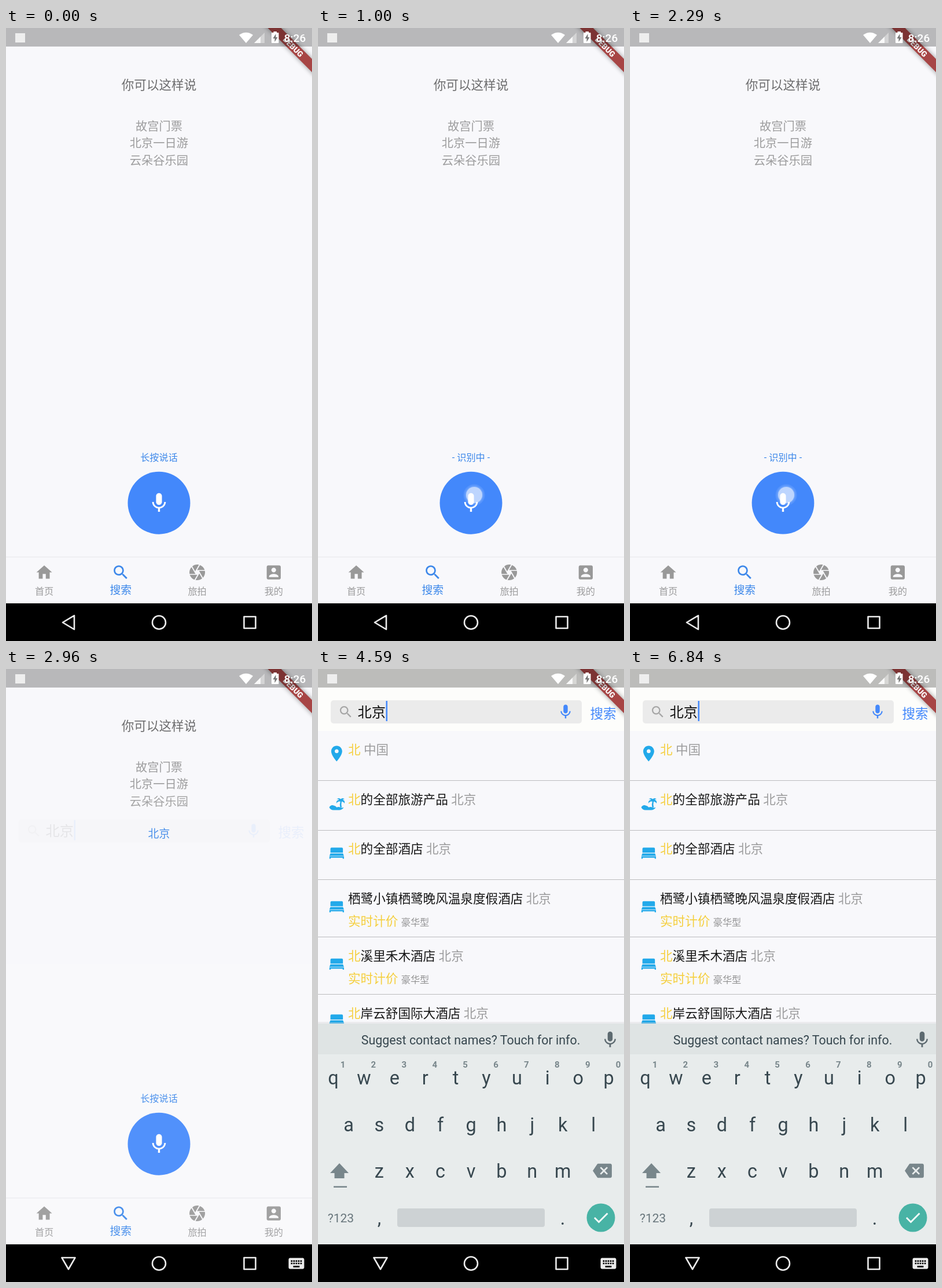
An HTML page for the animation above (6.89 s loop, 529 by 1058 pixels).

```html
<!DOCTYPE html>
<html lang="zh-CN">
<head>
<meta charset="utf-8">
<title>语音搜索</title>
<style>
  html, body { margin: 0; width: 100%; height: 100%; overflow: hidden; background: #f8f8fb; }
  svg { display: block; width: 100%; height: 100%; }
  text { font-family: Roboto, "Noto Sans CJK SC", "Noto Sans CJK", sans-serif; }
</style>
</head>
<body>
<svg id="stage" viewBox="0 0 529 1058"></svg>
<script>
const LOOP = 6890;
const PRESS = 980, PULSE = 680, RELEASE = 2440, RESULT = 2880, IME = 2920, RESUME = 4360, SETTLED = 4540;
const BG = '#f8f8fb', BLUE = '#4388fb', LINK = '#3d88ea', GREY = '#9c9c9d', YELLOW = '#f5cf3e', SKY = '#22a9ea', SLATE = '#37474f', DIM = '#78868b';

// 24-unit icon outlines
const ICON = {
  mic: 'M12 14c1.66 0 2.99-1.34 2.99-3L15 5c0-1.66-1.34-3-3-3S9 3.34 9 5v6c0 1.66 1.34 3 3 3zm5.3-3c0 3-2.54 5.1-5.3 5.1S6.7 14 6.7 11H5c0 3.41 2.72 6.23 6 6.72V21h2v-3.28c3.28-.48 6-3.3 6-6.72h-1.7z',
  search: 'M15.5 14h-.79l-.28-.27C15.41 12.59 16 11.11 16 9.5 16 5.91 13.09 3 9.5 3S3 5.91 3 9.5 5.91 16 9.5 16c1.61 0 3.09-.59 4.23-1.57l.27.28v.79l5 4.99L20.49 19l-4.99-5zm-6 0C7.01 14 5 11.99 5 9.5S7.01 5 9.5 5 14 7.01 14 9.5 11.99 14 9.5 14z',
  home: 'M10 20v-6h4v6h5v-8h3L12 3 2 12h3v8z',
  camera: 'M9.4 10.5l4.77-8.26C13.47 2.09 12.75 2 12 2c-2.4 0-4.6.85-6.32 2.25l3.66 6.35.06-.1zM21.54 9c-.92-2.92-3.15-5.26-6-6.34L11.88 9h9.66zm.26 1h-7.49l.29.5 4.76 8.25C21 16.97 22 14.61 22 12c0-.69-.07-1.35-.2-2zM8.54 12l-3.9-6.75C3.01 7.03 2 9.39 2 12c0 .69.07 1.35.2 2h7.49l-1.15-2zm-6.08 3c.92 2.92 3.15 5.26 6 6.34L12.12 15H2.46zm11.27 0l-3.9 6.76c.7.15 1.42.24 2.17.24 2.4 0 4.6-.85 6.32-2.25l-3.66-6.35-.93 1.6z',
  account: 'M3 5v14c0 1.1.89 2 2 2h14c1.1 0 2-.9 2-2V5c0-1.1-.9-2-2-2H5c-1.11 0-2 .9-2 2zm12 4c0 1.66-1.34 3-3 3s-3-1.34-3-3 1.34-3 3-3 3 1.34 3 3zm-9 8c0-2 4-3.1 6-3.1s6 1.1 6 3.1v1H6v-1z',
  place: 'M12 2C8.13 2 5 5.13 5 9c0 5.25 7 13 7 13s7-7.75 7-13c0-3.87-3.13-7-7-7zm0 9.5c-1.38 0-2.5-1.12-2.5-2.5s1.12-2.5 2.5-2.5 2.5 1.12 2.5 2.5-1.12 2.5-2.5 2.5z',
  bed: 'M5.5 5.5h13q1.5 0 1.5 1.5v5H4V7q0-1.500 1.500-1.500zM4 13h16l1.300 3H2.700zM2.700 16.700h18.600v3h-1.600v-1.300H4.300v1.300H2.700z',
  palm: 'M2.500 17q2-3.500 5.500-2.500 3 .5 4 2.500 2.500-1 4.500 0 1.500 1 4.500.2-2 3.300-6 3.300H8q-4 0-5.500-3.500zM16.500 17q-1-4 .2-7.500-3.700-.5-5 2.700-.7-4.500 3.500-4.700-1.700-1.500-3.200-.8 2.500-2.700 5.200-.3 2.300-2.400 4.900.3-1.600-.3-2.500.6 3.400.6 2.400 4.900-1-2.600-3.600-2.600-1 3.800.1 7.400z',
  backspace: 'M22 3H7c-.69 0-1.23.35-1.59.88L0 12l5.41 8.11c.36.53.9.89 1.59.89h15c1.1 0 2-.9 2-2V5c0-1.1-.9-2-2-2zm-3 12.59L17.59 17 14 13.41 10.41 17 9 15.59 12.59 12 9 8.41 10.41 7 14 10.59 17.59 7 19 8.41 15.41 12 19 15.59z',
  keyboard: 'M20 5H4c-1.1 0-1.99.9-1.99 2L2 17c0 1.1.9 2 2 2h16c1.1 0 2-.9 2-2V7c0-1.1-.9-2-2-2zm-9 3h2v2h-2V8zm0 3h2v2h-2v-2zM8 8h2v2H8V8zm0 3h2v2H8v-2zm-1 2H5v-2h2v2zm0-3H5V8h2v2zm9 7H8v-2h8v2zm0-4h-2v-2h2v2zm0-3h-2V8h2v2zm3 3h-2v-2h2v2zm0-3h-2V8h2v2z'
};

const icon = (name, cx, cy, scale, fill) =>
  `<path d="${ICON[name]}" fill="${fill}" transform="translate(${cx} ${cy}) scale(${scale}) translate(-12 -12)"/>`;
const rect = (x, y, w, h, fill, extra = '') =>
  `<rect x="${x}" y="${y}" width="${w}" height="${h}" fill="${fill}" ${extra}/>`;
const label = (str, x, baseline, size, fill, anchor = 'middle', extra = '') =>
  `<text x="${x}" y="${baseline}" font-size="${size}" fill="${fill}" text-anchor="${anchor}" ${extra}>${str}</text>`;
// Chinese text placed by the middle of its em box
const han = (str, x, cy, size, fill, anchor) => label(str, x, cy + size * 0.38, size, fill, anchor);
const span = (str, fill, size = 21.6) => `<tspan fill="${fill}" font-size="${size}">${str}</tspan>`;

function speakPage() {
  const tabs = [['home', '首页'], ['search', '搜索'], ['camera', '旅拍'], ['account', '我的']];
  return rect(0, 0, 529, 993, BG)
    + han('你可以这样说', 264.5, 98, 21.6, '#6c6c6d')
    + ['故宫门票', '北京一日游', '云朵谷乐园'].map((s, i) => han(s, 264.5, 169 + i * 29.7, 20.25, GREY)).join('')
    + `<g id="result">${han('北京', 264.5, 284, 18.9, LINK)}</g>`
    + `<g id="idle">${han('长按说话', 264.5, 741, 16.2, LINK)}</g>`
    + `<g id="busy">${han('- 识别中 -', 264.5, 741, 16.2, LINK)}</g>`
    + `<g id="mic"><circle id="disc" cx="264.500" cy="819.700" r="54" fill="${BLUE}"/>${icon('mic', 264.5, 819.7, 1.69, '#fff')}</g>`
    + rect(0, 912, 529, 2, '#000', 'opacity=".035"')
    + tabs.map(([name, s], i) => {
        const x = 66.1 + i * 132.25, on = i === 1;
        return icon(name, x, 939.6, 1.35, on ? LINK : '#999')
          + han(s, x, on ? 970 : 972, on ? 18.9 : 16.2, on ? LINK : GREY);
      }).join('');
}

function searchPage() {
  const rows = [
    ['place', 139, '北', '', '中国'],
    ['palm', 225, '北', '的全部旅游产品', '北京'],
    ['bed', 310, '北', '的全部酒店', '北京'],
    ['bed', 396, '', '栖鹭小镇栖鹭晚风温泉度假酒店', '北京', 409.5],
    ['bed', 495, '北', '溪里禾木酒店', '北京', 508.5],
    ['bed', 594, '北', '岸云舒国际大酒店', '北京', 605]
  ];
  const list = rows.map(([name, y, mark, title, place, iconY = y + 7]) =>
    icon(name, 32.3, iconY, 1.35, SKY)
    + han(`${span(mark, YELLOW)}${span(title, '#161616')} ${span(place, GREY)}`, 52, y, 21.6, GREY, 'start')
    + (title.length > 5 && y > 390 && y < 590
      ? han(`${span('实时计价', YELLOW)} ${span('豪华型', '#929293', 16.2)}`, 52, y + 39, 21.6, GREY, 'start') : '')
  ).join('');
  const lines = [192, 278, 363, 462, 561].map(y => rect(0, y, 529, 1, '#bcbcbe')).join('');
  return rect(0, 0, 529, 993, BG) + rect(0, 0, 529, 107, '#fdfdfb')
    + rect(22, 54, 434, 40, '#ebebeb', 'rx="5"')
    + icon('search', 48, 74, 1.125, '#a6a6a6')
    + han('北京', 68.5, 73.5, 24.3, '#111', 'start')
    + rect(117.5, 55, 2.5, 35, BLUE, 'id="cursor"')
    + icon('mic', 428, 74, 1.24, BLUE)
    + han('搜索', 493, 76, 22.6, BLUE)
    + `<g id="list">${list}${lines}</g>`;
}

function keyboard() {
  const step = 52.9;
  const row = (keys, x, baseline) =>
    [...keys].map((k, i) => label(k, x + i * step, baseline, 32.4, SLATE)).join('');
  return rect(0, 609, 529, 3, '#000', 'opacity=".05"')
    + rect(0, 612, 529, 381, '#e8ecec') + rect(0, 612, 529, 53, '#dfe4e4')
    + label('Suggest contact names? Touch for info.', 264, 648, 21.4, SLATE)
    + icon('mic', 505, 640, 1.42, '#5d6a70')
    + row('qwertyuiop', 26.5, 717) + row('asdfghjkl', 53, 798) + row('zxcvbnm', 105.8, 878)
    + [...'1234567890'].map((n, i) => label(n, 43 + i * step, 688, 15, DIM, 'middle', 'font-weight="700"')).join('')
    + `<path d="M37 853L53 870H45.500V879H28.500V870H21Z" fill="${DIM}"/>` + rect(27, 892.5, 23, 2.5, DIM)
    + icon('backspace', 491.500, 866, 1.37, DIM)
    + label('?123', 39.5, 955, 21, '#67757b') + label(',', 106, 959, 32.4, SLATE) + label('.', 423, 959, 32.4, SLATE)
    + rect(137, 931, 255, 32, '#cdd2d4', 'rx="4"')
    + '<circle cx="489" cy="947" r="24.500" fill="#48b3a5"/>'
    + '<path d="M478 947L485.500 954.500 500.500 939.500" fill="none" stroke="#fff" stroke-width="2.800"/>';
}

function systemBars() {
  return `<g transform="translate(529 0) rotate(45)">
      ${rect(-80, 37.8, 160, 16.2, '#000', 'opacity=".4" filter="url(#soft)"')}
      ${rect(-80, 37.8, 160, 16.2, '#a74545')}
      ${label('DEBUG', 0, 50.8, 13.4, '#fff', 'middle', 'font-weight="900"')}
    </g>`
    + rect(0, 0, 529, 32, '#000', 'opacity=".26"')
    + rect(16, 9, 17, 16, '#eee')
    + '<path d="M415 26L403 12Q415 3.500 427 12Z" fill="#fff"/>'
    + '<path d="M429 26L447 8V26Z" fill="#fff" opacity=".4"/><path d="M429 26L440 15V26Z" fill="#fff" opacity=".85"/>'
    + rect(459, 8, 12.5, 18, '#fff', 'rx="1"') + rect(462.5, 6, 5.5, 3, '#fff')
    + '<path d="M466.500 10L461.500 18H464.500V24L469.500 16H466.500Z" fill="#777"/>'
    + label('8:26', 499.5, 24, 19, '#fff', 'middle', 'font-weight="500"')
    + rect(0, 993, 529, 65, '#000')
    + '<g fill="none" stroke="#ececec" stroke-width="2.600" stroke-linejoin="round">'
    + '<path id="back" d="M98 1026L118 1014V1038Z"/><path id="hide" d="M96.500 1016H119.500L108 1036Z"/>'
    + '<circle cx="264.500" cy="1026" r="11.500"/><rect x="411.500" y="1016" width="20" height="20"/></g>'
    + `<g id="ime">${icon('keyboard', 502, 1026, 1.35, '#ececec')}</g>`;
}

document.getElementById('stage').innerHTML =
  '<defs><filter id="soft" x="-20%" y="-80%" width="140%" height="260%"><feGaussianBlur stdDeviation="4"/></filter></defs>'
  + speakPage()
  + `<g id="page">${searchPage()}</g><g id="keys">${keyboard()}</g>`
  + systemBars()
  + '<g id="touch" fill="#fff"><circle cx="270" cy="806" r="18.500" opacity=".1"/>'
  + '<circle cx="270" cy="806" r="16" opacity=".14"/><circle cx="270" cy="806" r="14" opacity=".55"/></g>';

const part = Object.fromEntries([...document.querySelectorAll('[id]')].map(e => [e.id, e]));
const show = (name, on) => { part[name].style.display = on ? '' : 'none'; };
const clamp = v => Math.min(1, Math.max(0, v));

function bezier(x1, y1, x2, y2) {
  const at = (a, b, s) => 3 * a * s * (1 - s) ** 2 + 3 * b * s * s * (1 - s) + s ** 3;
  return x => {
    let lo = 0, hi = 1;
    for (let i = 0; i < 24; i++) {
      const mid = (lo + hi) / 2;
      if (at(x1, x2, mid) < x) lo = mid; else hi = mid;
    }
    return at(y1, y2, (lo + hi) / 2);
  };
}
const easeIn = bezier(0.42, 0, 1, 1);
const fastOutSlowIn = bezier(0.4, 0, 0.2, 1);
const decelerate = bezier(0, 0, 0.2, 1);

function draw(t) {
  const pressed = t >= PRESS && t < RELEASE;
  const cycle = pressed ? (t - PRESS) / PULSE % 2 : 0;
  const pulse = easeIn(cycle < 1 ? cycle : 2 - cycle);
  part.disc.setAttribute('r', 54 - 13.5 * pulse);
  part.mic.setAttribute('opacity', 1 - 0.5 * pulse);
  show('busy', pressed);
  show('idle', !pressed);
  show('touch', pressed);
  show('result', t >= RESULT);

  // the page transition stalls early on, then finishes
  const rest = clamp((t - RESUME) / (SETTLED - RESUME));
  const enter = 0.22 * clamp((t - RESULT) / 80) + 0.78 * rest;
  part.page.setAttribute('opacity', easeIn(enter));
  part.page.setAttribute('transform', `translate(0 ${248 * (1 - fastOutSlowIn(enter))})`);
  show('page', t >= RESULT);
  show('list', t >= 4520);
  show('cursor', t < 4380 || Math.floor((t - 4380) / 500) % 2 === 0);

  part.keys.setAttribute('transform', `translate(0 ${384 * (1 - decelerate(rest))})`);
  show('keys', t >= RESUME);
  show('back', t < IME);
  show('hide', t >= IME);
  show('ime', t >= IME);
}

const start = performance.now();
function tick() {
  draw((performance.now() - start) % LOOP);
  requestAnimationFrame(tick);
}
tick();
</script>
</body>
</html>
```
